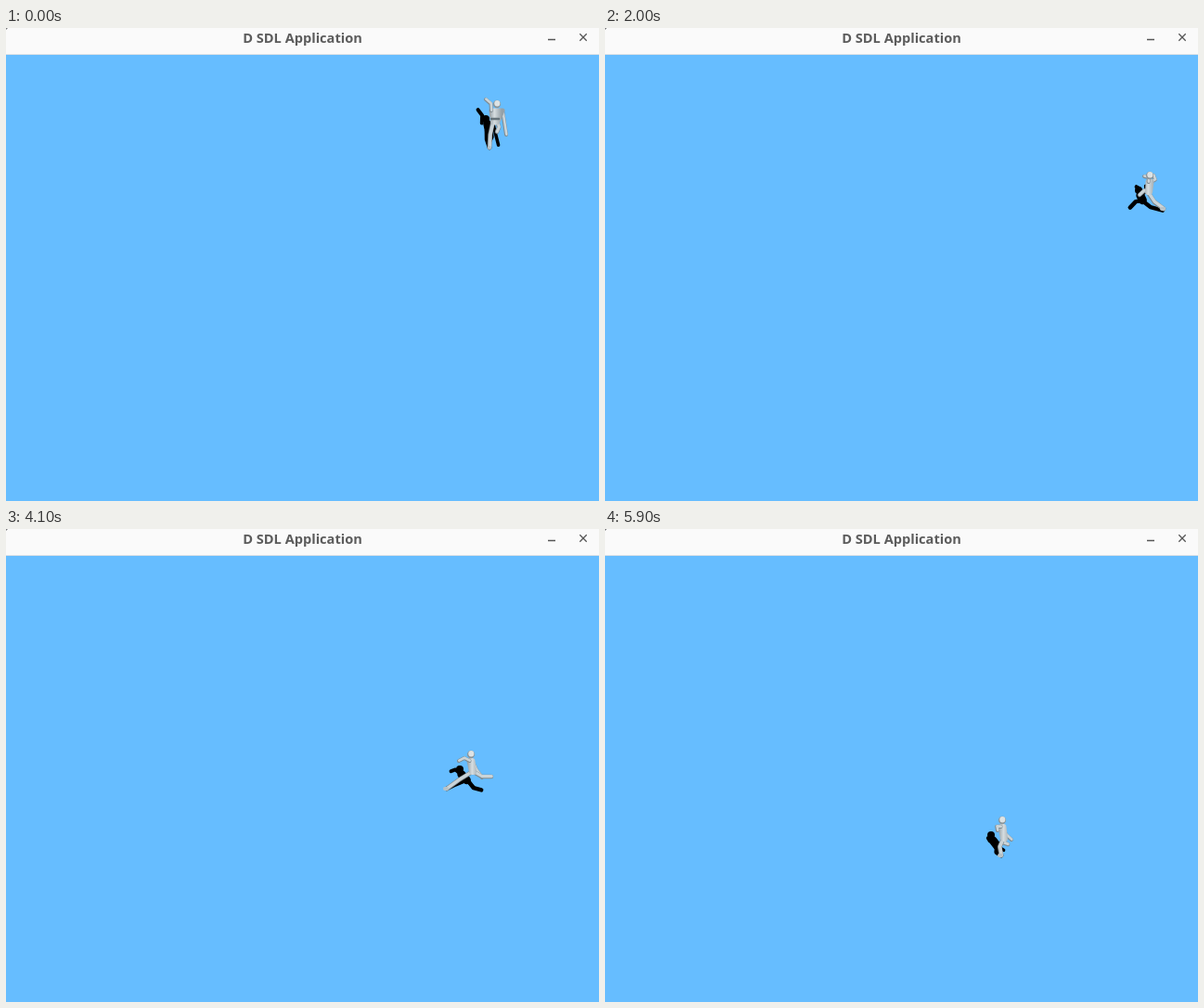
An HTML page with a canvas that plays this animation: 639x510 px, repeating every 6.1 s.

```html
<!DOCTYPE html>
<html lang="en">
<head>
<meta charset="utf-8">
<title>D SDL Application</title>
<style>
  html, body { margin: 0; width: 100%; height: 100%; overflow: hidden; background: #66bdff; }
  header {
    position: absolute; left: 0; top: 0; width: 639px; height: 28px;
    background: #fafafa; border-bottom: 1px solid #d9e0e6; box-sizing: content-box;
  }
  svg, canvas { position: absolute; left: 0; top: 0; display: block; }
  text { font: bold 14.6px "Open Sans", "Noto Sans", sans-serif; fill: #5c5c5c; }
</style>
</head>
<body>
<header></header>
<canvas id="stage" width="639" height="510"></canvas>
<svg width="639" height="29">
  <path d="M0 0h2L0 2z" fill="#77777a"/>
  <text x="319.5" y="16" text-anchor="middle">D SDL Application</text>
  <path d="M584 12.5h8M618.3 6.3l7.4 7.4M625.7 6.3l-7.4 7.4" fill="none" stroke="#555" stroke-width="1.3"/>
</svg>
<script>
const ctx = document.getElementById('stage').getContext('2d');
const STEP = 100, LOOP = 6100, LAST = 59, TURN = 17, SPEED = 4;

// Half a run cycle per heading: head, hip, hands A B, feet A B, foot lifts A B
const side = [
  [[29, 9], [31, 28], [16, 16], [41, 34], [3, 46], [51, 33], 0, .9],
  [[29, 12], [31, 30], [17, 18], [41, 33], [-2, 47], [50, 36], 0, .8],
  [[28, 8], [30, 28], [23, 19], [38, 29], [27, 46], [34, 34], 0, .7],
  [[31, 9], [30, 27], [25, 10], [35, 9], [46, 45], [20, 30], .1, .85]
];
const front = [
  [[27, 12], [27, 32], [12, 38], [39, 12], [23, 40], [33, 54], .6, .2],
  [[28, 13], [27, 32], [5, 20], [40, 30], [20, 46], [32, 50], .4, .1],
  [[28, 13], [27, 33], [15, 10], [39, 44], [21, 63], [30, 46], 0, .6],
  [[29, 12], [27, 32], [17, 7], [39, 45], [21, 59], [29, 42], 0, .7]
];

const flip = ([x, y]) => [55 - x, y];
const swap = ([head, hip, hA, hB, fA, fB, lA, lB]) => [head, hip, hB, hA, fB, fA, lB, lA];
const mirror = pose => swap(pose).map(v => Array.isArray(v) ? flip(v) : v);

function poseAt(step, facing) {
  const k = (step + (facing ? 3 : 7)) % 8;
  const pose = (facing ? front : side)[k % 4];
  return k < 4 ? pose : facing ? mirror(pose) : swap(pose);
}

// Middle joint of a limb: the shorter it looks, the more it bends
function bend(a, b, len, amount) {
  const dx = b[0] - a[0], dy = b[1] - a[1], d = Math.hypot(dx, dy) || 1;
  const k = amount * Math.sqrt(Math.max(0, len * len - d * d)) / d;
  return [(a[0] + b[0]) / 2 - dy * k, (a[1] + b[1]) / 2 + dx * k];
}

function line(points, width, color) {
  ctx.beginPath();
  points.forEach(p => ctx.lineTo(p[0], p[1]));
  ctx.lineWidth = width;
  ctx.strokeStyle = color;
  ctx.stroke();
}

function limb(points, width) {
  line(points, width, '#7f8b91');
  line(points.map(([x, y]) => [x + .3, y - .4]), width - 1.4, '#cbd4d8');
}

function blob([x, y], rx, ry, fill) {
  ctx.beginPath();
  ctx.ellipse(x, y, rx, ry, 0, 0, 7);
  ctx.fillStyle = fill;
  ctx.fill();
}

function figure(pose, facing) {
  const [head, hip, handA, handB, footA, footB, liftA, liftB] = pose;
  const half = facing ? 6 : 1.5, waist = facing ? 2.5 : 1;
  const at = (p, dx, dy) => [p[0] + dx, p[1] + dy];
  const shA = at(head, -half, 7), shB = at(head, half, 7);
  const hipA = at(hip, -waist, 0), hipB = at(hip, waist, 0);
  const arm = (s, hand, k) => [s, bend(s, hand, 22, k), hand];
  const leg = (h, foot, k) => [h, bend(h, foot, 33, k), foot];
  const armA = arm(shA, handA, .16), armB = arm(shB, handB, facing ? -.16 : .16);
  const legA = leg(hipA, footA, facing ? .06 : .1), legB = leg(hipB, footB, facing ? -.06 : .1);
  const chest = at(head, 0, 8);

  // Ground shadow: raised points fall down and to the left
  const cast = (points, lifts) => points.map(([x, y], i) => [x - 12 * lifts[i], y + 16 * lifts[i]]);
  const dark = (points, lifts, width) => line(cast(points, lifts), width, '#000');
  dark(armA, [.85, .78, .7], 4);
  dark(armB, [.85, .78, .7], 3.5);
  dark(legA, [.55, .3 + liftA / 2, liftA], 4.5);
  dark(legB, [.55, .3 + liftB / 2, liftB], 4.5);
  dark([chest, hip], [.85, .55], 9);
  blob(cast([head], [1])[0], 4, 4, '#000');

  limb(armB, 4);
  limb(legB, 4.5);
  limb(legA, 4.8);
  line([footA, at(footA, facing ? 0 : -2, 0)], 4, '#b8c2c7');

  const shade = ctx.createLinearGradient(hip[0] - 7, 0, hip[0] + 7, 0);
  shade.addColorStop(0, '#87939a');
  shade.addColorStop(.45, '#d6dde0');
  shade.addColorStop(1, '#96a1a7');
  line([shA, hipA, hipB, shB, shA], facing ? 5 : 6, shade);
  ctx.fillStyle = shade;
  ctx.fill();
  if (facing) line([at(hip, -4, -4), at(hip, 4, -4)], 2.5, '#66737a');
  limb(armA, 4);
  blob(head, 4, 4.3, '#89949a');
  blob(at(head, .3, -.7), 3, 3.2, '#dde3e5');
}

ctx.lineCap = ctx.lineJoin = 'round';

function draw() {
  const step = Math.min(LAST, Math.floor(performance.now() % LOOP / STEP));
  const facing = step < TURN;
  ctx.clearRect(0, 0, 639, 510);
  ctx.save();
  ctx.translate(500 + SPEED * Math.min(step, 2 * TURN - step), 70 + SPEED * step);
  figure(poseAt(step, facing), facing);
  ctx.restore();
  requestAnimationFrame(draw);
}
draw();
</script>
</body>
</html>
```
